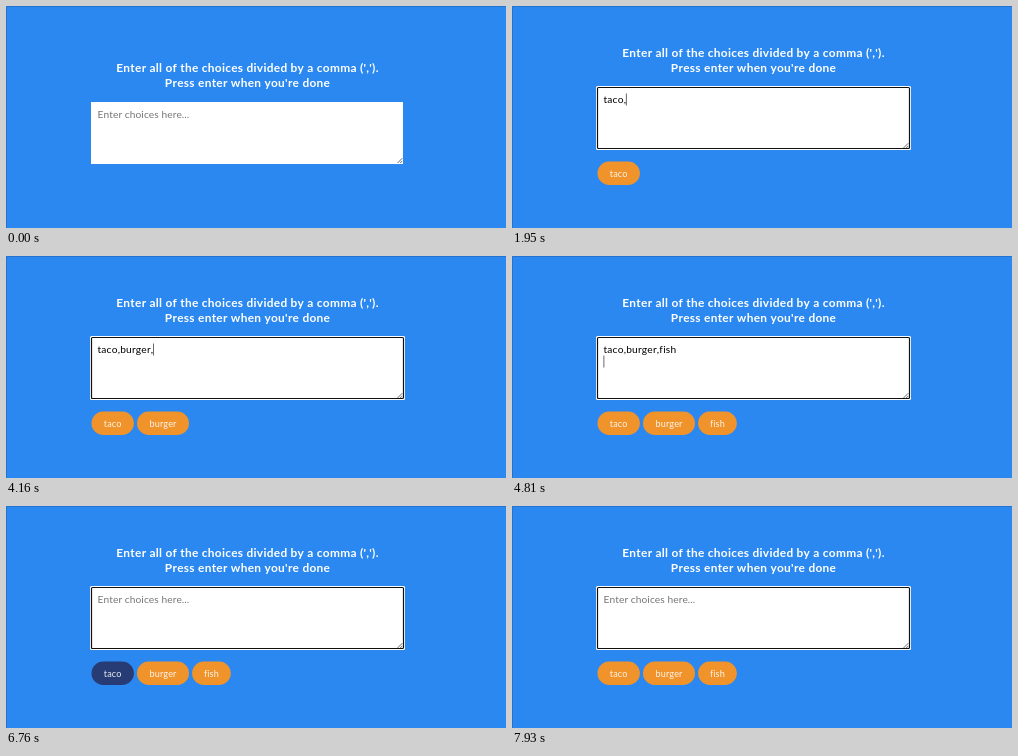
Write an HTML page that moves like this. It is 500x222 px and loops after 8000 ms.

```html
<!DOCTYPE html>
<html lang="en">
<head>
<meta charset="utf-8">
<title>Choice picker</title>
<style>
html, body { margin: 0; width: 100%; height: 100%; overflow: hidden; background: #2b88f0; }
svg { display: block; width: 500px; height: 222px; font-family: Lato, "Open Sans", sans-serif; font-kerning: none; }
.title { font-size: 11.9px; font-weight: 700; letter-spacing: .28px; fill: #fff; text-anchor: middle; }
.field { font-size: 10.2px; letter-spacing: .2px; }
#hint { letter-spacing: .07px; }
.tag { font-size: 9.1px; letter-spacing: .1px; fill: #fff; fill-opacity: .9; text-anchor: middle; }
</style>
</head>
<body>
<svg viewBox="0 0 500 222">
  <rect width="500" height="222" fill="#2b88f0"/>
  <path d="M.5 222 V.5 H500" fill="none" stroke="#2474cf"/>
  <g id="form">
    <text class="title" x="241.5" y="66.4">Enter all of the choices divided by a comma (',').</text>
    <text class="title" x="241.5" y="81">Press enter when you're done</text>
    <rect x="85" y="96" width="312" height="62" fill="#fff"/>
    <g id="ring">
      <rect x="84" y="95" width="315" height="64" rx="1.5" fill="#fff"/>
      <rect x="85.5" y="96.5" width="312" height="61" rx="1" fill="#fff" stroke="#101010" stroke-width="1.2"/>
    </g>
    <path d="M391.5 157 L396.3 152.2 M394.2 157 L396.3 154.9" stroke="#444" stroke-width=".8"/>
    <text id="hint" class="field" x="91.5" y="112" fill="#757575">Enter choices here...</text>
    <text id="value" class="field" x="91.5" y="112" fill="#000"></text>
    <rect id="caret" width=".8" height="12" fill="#444"/>
  </g>
  <g id="tags"></g>
</svg>
<script>
const NS = "http://www.w3.org/2000/svg";
const LOOP = 8000, BLINK = 520, SHIFT = 15, LEFT = 91.5, FIELD_SCALE = 1.12;
const $ = id => document.getElementById(id);
const set = (el, attrs) => { for (const k in attrs) el.setAttribute(k, attrs[k]); };
const show = (el, on) => el.style.display = on ? "" : "none";

// Letter advances at tag size
const ADV = { t: 3.8, a: 4.8, c: 4.4, o: 5, b: 5.1, u: 5, r: 3.6, g: 5.3, e: 5, f: 3.1, i: 2.2, s: 4, h: 5, ",": 2 };
const measure = s => [...s].reduce((w, c) => w + (ADV[c] || 0), 0);

// [time, value]
const typed = [
  [0, ""], [1040, "t"], [1170, "ta"], [1560, "tac"], [1690, "taco"], [1950, "taco,"],
  [2210, "taco,b"], [2340, "taco,bu"], [2470, "taco,bur"], [2730, "taco,burg"],
  [2860, "taco,burge"], [2990, "taco,burger"], [4160, "taco,burger,"],
  [4290, "taco,burger,f"], [4420, "taco,burger,fi"], [4550, "taco,burger,fis"],
  [4680, "taco,burger,fish"], [4810, "taco,burger,fish\n"], [5070, ""]
];
// Tags follow on key release
const tagged = [
  [0, ""], [1300, "ta"], [1690, "tac"], [1820, "taco"], [2340, "taco,b"],
  [2470, "taco,bu"], [2600, "taco,bur"], [2730, "taco,burg"], [2990, "taco,burge"],
  [3120, "taco,burger"], [4420, "taco,burger,f"], [4550, "taco,burger,fi"],
  [4680, "taco,burger,fis"], [4810, "taco,burger,fish"]
];
const FOCUS = 390, CLEAR = 5070, SPIN = 5200, STEP = 130;
const picks = "020010210211020112012";

const at = (list, t) => list.reduce((cur, e) => e[0] <= t ? e : cur)[1];

// Typing restarts the caret blink; clearing does not
function lastReset(t) {
  let r = FOCUS;
  for (const [s] of typed) if (s > FOCUS && s <= t && s < CLEAR) r = s;
  return r;
}

const pills = [0, 1, 2].map(() => {
  const rect = document.createElementNS(NS, "rect");
  const label = document.createElementNS(NS, "text");
  set(rect, { y: 155.5, height: 23.5, rx: 11.75 });
  set(label, { class: "tag", y: 170.6 });
  $("tags").append(rect, label);
  return { rect, label };
});

function drawTags(words, pick) {
  let x = 85.5;
  pills.forEach(({ rect, label }, i) => {
    const word = words[i];
    show(rect, word);
    show(label, word);
    if (!word) return;
    const w = measure(word) + 24.4;
    set(rect, { x, width: w, fill: i === pick ? "#273c75" : "#f0932b" });
    set(label, { x: x + w / 2 });
    label.textContent = word;
    x += w + 3.1;
  });
}

function draw(t) {
  const value = at(typed, t);
  const words = at(tagged, t).split(",").filter(Boolean);
  const focused = t >= FOCUS;
  const broken = value.endsWith("\n");

  $("form").setAttribute("transform", `translate(0 ${words.length ? -SHIFT : 0})`);
  show($("ring"), focused);
  show($("hint"), !value);
  $("value").textContent = value.trim();

  const lit = Math.floor((t - lastReset(t)) / BLINK) % 2 === 0;
  show($("caret"), focused && lit && t < SPIN + picks.length * STEP);
  set($("caret"), {
    x: LEFT + (broken ? 0 : measure(value) * FIELD_SCALE),
    y: broken ? 114.5 : 102.5
  });

  const pick = t < SPIN ? undefined : picks[Math.floor((t - SPIN) / STEP)];
  drawTags(words, pick === undefined ? -1 : +pick);
}

const start = performance.now();
function tick() {
  draw((performance.now() - start) % LOOP);
  requestAnimationFrame(tick);
}
draw(0);
requestAnimationFrame(tick);
</script>
</body>
</html>
```
